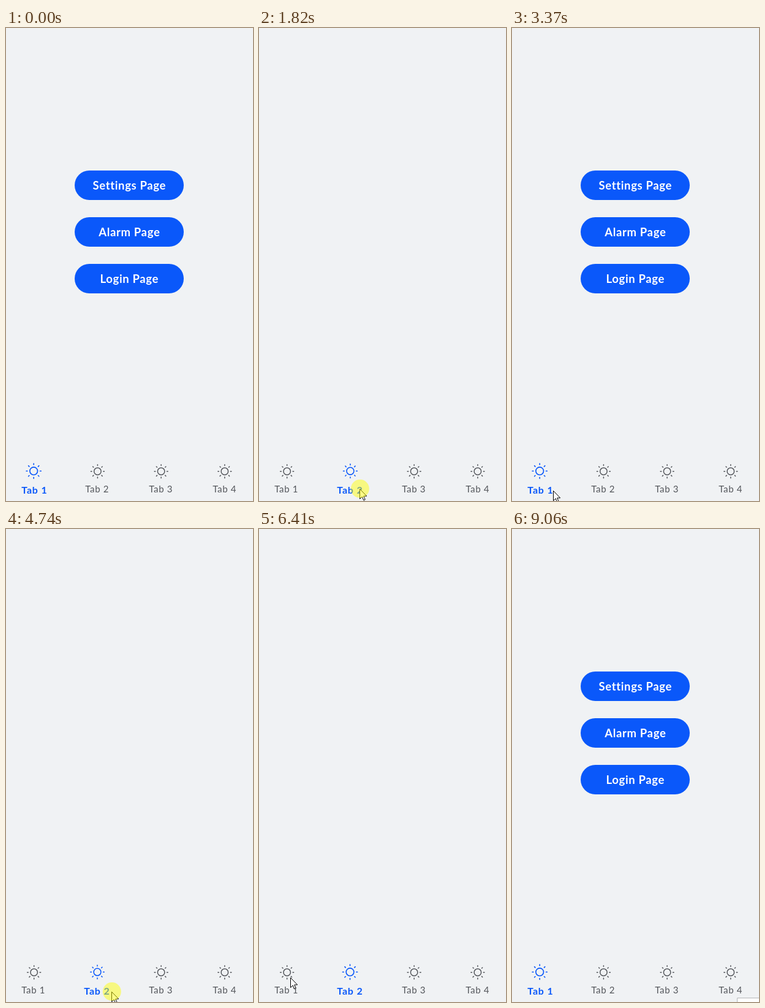
Animation of 403 by 770 pixels, one loop 9110 ms. Source, as an HTML page with a canvas:

```html
<!DOCTYPE html>
<html lang="en">
<head>
<meta charset="utf-8">
<title>Tab bar</title>
<style>
html, body { margin: 0; width: 100%; height: 100%; overflow: hidden; background: #f0f2f4; }
canvas { display: block; width: 403px; height: 770px; }
</style>
</head>
<body>
<canvas></canvas>
<script>
const W = 403, H = 770, LOOP = 9110;
const BG = '#f0f2f4', BLUE = '#0a58fa', GRAY = '#53565b';
const canvas = document.querySelector('canvas');
const ctx = canvas.getContext('2d');
const ratio = window.devicePixelRatio || 1;
canvas.width = W * ratio;
canvas.height = H * ratio;

// The pointer rests between moves; some rests end with a tap on a tab.
const moves = [
  { at: 1150, lasts: 200, x: 164, y: 750 },
  { at: 2260, lasts: 550, x: 67, y: 753 },
  { at: 3375, lasts: 515, x: 172, y: 753 },
  { at: 5060, lasts: 480, x: 353, y: 730 },
  { at: 6080, lasts: 320, x: 51, y: 730 },
  { at: 6560, lasts: 230, x: 158, y: 454 },
  { at: 7090, lasts: 190, x: 430, y: 500 }
];
const taps = [
  { at: 1770, tab: 1 }, { at: 3040, tab: 0 },
  { at: 4740, tab: 1 }, { at: 6450, tab: 0 }
];
const HOLD = 240, GROW = 200;

const clamp = u => Math.max(0, Math.min(1, u));
const smooth = u => u * u * (3 - 2 * u);
const mix = (a, b, u) => a + (b - a) * u;

function pointerAt(t) {
  // A last brief pass through the bottom right corner
  const pass = (t - 7450) / 270;
  if (pass > 0) return [403 - 24 * Math.sin(Math.PI * clamp(pass)), mix(676, 772, clamp(pass))];

  let x = 164, y = 772;
  for (const m of moves) {
    const u = smooth(clamp((t - m.at) / m.lasts));
    x = mix(x, m.x, u);
    y = mix(y, m.y, u);
  }
  return [x, y];
}

function text(str, x, y, font, color, spacing, align = 'left') {
  ctx.font = font + 'px Lato, sans-serif';
  ctx.letterSpacing = spacing + 'px';
  ctx.textAlign = align;
  ctx.fillStyle = color;
  ctx.fillText(str, x, y);
}

function sun(x, y, scale, color) {
  ctx.save();
  ctx.translate(x, y);
  ctx.scale(scale, scale);
  ctx.strokeStyle = color;
  ctx.lineWidth = 1.5;
  ctx.lineCap = 'round';
  ctx.beginPath();
  ctx.arc(0, 0, 5.75, 0, Math.PI * 2);
  for (let k = 0; k < 8; k++) {
    const c = Math.cos(k * Math.PI / 4), s = Math.sin(k * Math.PI / 4);
    ctx.moveTo(9.4 * c, 9.4 * s);
    ctx.lineTo(11 * c, 11 * s);
  }
  ctx.stroke();
  ctx.restore();
}

function button(label, y) {
  ctx.fillStyle = BLUE;
  ctx.beginPath();
  ctx.roundRect(112, y, 178, 48, 24);
  ctx.fill();
  text(label, 201.3, y + 31, '700 18.5', '#fff', 0.65, 'center');
}

function tab(i, active, age) {
  const label = 'Tab ' + (i + 1);
  if (active) {
    const u = smooth(clamp(age / GROW));
    sun(mix(45.7, 45.2, u) + 103.3 * i, 721.2, mix(1.02, 1.1, u), BLUE);
    text(label, 25.3 + 102 * i, 758, '700 16', BLUE, 0.8);
  } else {
    sun(45.7 + 103.7 * i, 721.7, 1, GRAY);
    text(label, 25.2 + 104 * i, 756, '400 15', GRAY, 0.7);
  }
}

const arrow = new Path2D('M.5 .5V16.5L4.2 13L6.8 18.8L9.2 17.8L6.7 12H11.7Z');

function pointer(x, y, pressed) {
  ctx.save();
  ctx.translate(Math.round(x), Math.round(y));
  ctx.fillStyle = '#fff';
  ctx.strokeStyle = '#000';
  ctx.lineWidth = 1;
  ctx.fill(arrow);
  ctx.stroke(arrow);
  if (pressed) {
    ctx.fillStyle = 'rgba(255, 255, 0, .47)';
    ctx.beginPath();
    ctx.arc(0.8, 0, 15, 0, Math.PI * 2);
    ctx.fill();
  }
  ctx.restore();
}

// Edge of a panel fading in at the bottom right
function corner(t) {
  ctx.globalAlpha = clamp((t - 8770) / 120);
  ctx.fillStyle = '#fff';
  ctx.strokeStyle = '#b4b6b8';
  ctx.lineWidth = 1;
  ctx.beginPath();
  ctx.rect(367.5, 763.5, 60, 30);
  ctx.fill();
  ctx.stroke();
  ctx.globalAlpha = 1;
}

function draw(t) {
  ctx.setTransform(ratio, 0, 0, ratio, 0, 0);
  ctx.fillStyle = BG;
  ctx.fillRect(0, 0, W, H);

  const tap = taps.findLast(p => p.at <= t) || { at: -LOOP, tab: 0 };
  const age = t - tap.at;
  if (tap.tab === 0) {
    ['Settings', 'Alarm', 'Login'].forEach((name, i) => button(name + ' Page', 232 + 76 * i));
  }
  for (let i = 0; i < 4; i++) tab(i, i === tap.tab, age);
  pointer(...pointerAt(t), age < HOLD && t < 6560 + 40);
  corner(t);
}

const begin = performance.now();
function frame() {
  draw((performance.now() - begin) % LOOP);
  requestAnimationFrame(frame);
}
frame();
</script>
</body>
</html>
```
